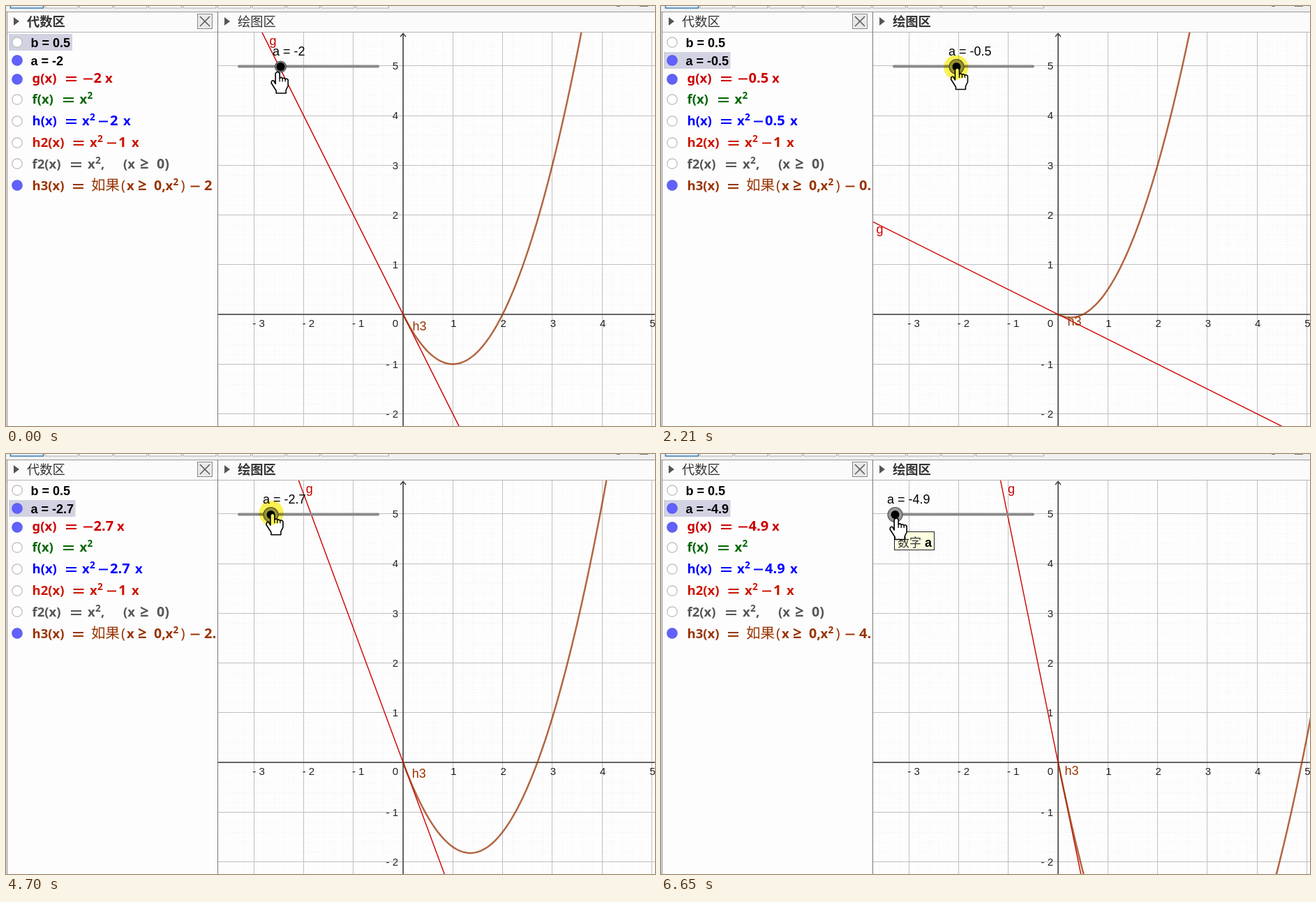
Animation of 930 by 602 pixels, one loop 7.08 s. Source, as an HTML page with a canvas:

```html
<!DOCTYPE html>
<html lang="zh">
<head>
<meta charset="utf-8">
<title>Slider and function graph</title>
<style>
html, body { margin: 0; width: 100%; height: 100%; overflow: hidden; background: #fff; }
canvas { display: block; }
</style>
</head>
<body>
<canvas id="stage" width="930" height="602"></canvas>
<script>
const ctx = document.getElementById('stage').getContext('2d');
const W = 930, H = 602, LOOP = 7080;
const OX = 569, OY = 442, UNIT = 71.3;
const LEFT = 304, TOP = 38;
const ARIAL = '"Liberation Sans", Arial, sans-serif';
const MATH = '"Noto Sans", "Open Sans", sans-serif';
const CJK = '"Noto Sans CJK SC", "Noto Sans CJK", sans-serif';

// [time, value] pairs
const SLIDE = [[730, -2], [1150, -1.68], [1460, -1.3], [1510, -1.22], [2210, -0.545], [2215, -0.5],
  [2740, -0.5], [3080, -1.16], [3210, -1.24], [3380, -1.6], [3480, -1.6], [3960, -2.06],
  [4070, -2.14], [4140, -2.2], [4230, -2.22], [4950, -2.9], [4980, -2.92], [5200, -3.17],
  [5250, -3.24], [5650, -4.3], [5700, -4.33], [6030, -4.87], [6040, -4.9]];
const HAND_Y = [[760, 89], [1140, 89.5], [2210, 89], [3080, 88], [3960, 85.5], [5200, 85],
  [6030, 89], [6170, 90]];

function track(keys, t) {
  if (t <= keys[0][0]) return keys[0][1];
  for (let i = 1; i < keys.length; i++) {
    const [t1, v1] = keys[i], [t0, v0] = keys[i - 1];
    if (t < t1) return v0 + (v1 - v0) * (t - t0) / (t1 - t0);
  }
  return keys[keys.length - 1][1];
}

const px = x => OX + x * UNIT;
const py = y => OY - y * UNIT;

function rect(x, y, w, h, color) {
  ctx.fillStyle = color;
  ctx.fillRect(x, y, w, h);
}

function disc(x, y, r, fill, stroke, width = 1) {
  ctx.beginPath();
  ctx.arc(x, y, r, 0, Math.PI * 2);
  if (fill) { ctx.fillStyle = fill; ctx.fill(); }
  if (stroke) { ctx.strokeStyle = stroke; ctx.lineWidth = width; ctx.stroke(); }
}

function line(points, color, width) {
  ctx.beginPath();
  points.forEach(([x, y]) => ctx.lineTo(x, y));
  ctx.strokeStyle = color;
  ctx.lineWidth = width;
  ctx.stroke();
}

function text(s, x, y, font, color, align = 'left') {
  ctx.font = font;
  ctx.fillStyle = color;
  ctx.textAlign = align;
  ctx.fillText(s, x, y);
  return ctx.measureText(s).width;
}

function triangle(x, y) {
  ctx.beginPath();
  ctx.moveTo(x, y - 6);
  ctx.lineTo(x + 8, y);
  ctx.lineTo(x, y + 6);
  ctx.fillStyle = '#555';
  ctx.fill();
}

function drawChrome(active) {
  rect(0, 0, W, 8, '#f0f0f0');
  for (let i = 0; i < 11; i++) {
    const x = 6.5 + i * 49.5;
    rect(x, 0, 47, 3, i ? '#fafafa' : '#e3eefa');
    line([[x, -1], [x, 3], [x + 47, 3], [x + 47, -1]], i ? '#aaa' : '#3c7fb1', i ? 1 : 1.6);
  }
  rect(875, 0, 5, 1, '#777');
  rect(908, 0, 12, 1, '#777');
  rect(0, 8, W, 1, '#999');
  rect(2, 9, W, 28, '#fbfbfb');
  rect(2, 37, W, 1, '#b4b4b4');
  rect(0, 9, 1, H, '#f0f0f0');
  rect(1, 9, 1, H, '#888');
  rect(303, 9, 1, H, '#777');
  triangle(11, 22);
  triangle(313, 22);
  const title = on => (on ? 'bold ' : '') + '18.3px ' + CJK;
  text('代数区', 30, 29, title(!active), '#333');
  text('绘图区', 332, 29, title(active), '#333');
  rect(274.5, 11.5, 21, 21, '#e9e9e9');
  ctx.strokeStyle = '#888';
  ctx.lineWidth = 1;
  ctx.strokeRect(274.5, 11.5, 21, 21);
  line([[278, 15], [292, 29]], '#555', 1.5);
  line([[292, 15], [278, 29]], '#555', 1.5);
}

// One algebra row: tools that share a baseline and colour
function row(y, color) {
  const put = (s, x, size = 18.5) => text(s, x, y, `bold ${size}px ${MATH}`, color);
  const bar = (x, w, dy) => rect(x, y - dy, w, 2, color);
  return {
    put,
    eq(x) { bar(x, 15, 9); bar(x, 15, 4); },
    minus(x) { bar(x, 13, 6.5); },
    square(x) {
      put('x', x);
      text('2', x + 11, y - 7, `bold 13.5px ${MATH}`, color);
    },
    term(n, x, gap) {
      const w = put(n, x, 20);
      put('x', x + w + gap);
    }
  };
}

function drawAlgebra(a, active) {
  const num = String(-a);
  const bold = 'bold 18px ' + ARIAL;
  const aText = 'a = ' + a;
  ctx.font = bold;
  if (active) rect(4, 66, ctx.measureText(aText).width + 34, 24, '#d2d2e2');
  else rect(4, 40, 91, 24, '#d2d2e2');

  [52, 78, 105, 134, 165, 196, 226, 257].forEach((y, i) => {
    const on = [1, 2, 7].includes(i);
    disc(16, y, 7.2, on ? '#6161ff' : '#fff', on ? '#5858e8' : '#b8b8b8', 1.2);
  });
  text('b = 0.5', 35.5, 58.5, bold, '#000');
  text(aText, 35.5, 84.5, bold, '#000');

  ctx.save();
  ctx.beginPath();
  ctx.rect(2, 38, 298, H);
  ctx.clip();

  let r = row(110, '#cc0000');
  r.put('g(x)', 37.5); r.eq(86); r.minus(111); r.term(num, 125.5, 5);

  r = row(140, '#006400');
  r.put('f(x)', 37.5); r.eq(82); r.square(105.5);

  r = row(171, '#0000ff');
  r.put('h(x)', 37.5); r.eq(86); r.square(109); r.minus(133); r.term(num, 149, 7.5);

  r = row(202, '#cc1400');
  r.put('h2(x)', 37.5); r.eq(96.5); r.square(120); r.minus(145); r.term('1', 161, 7.5);

  r = row(233, '#555');
  r.put('f2(x)', 37.5); r.eq(93); r.square(117); r.put(',', 136);
  r.put('(x', 168); r.put('≥', 192, 22); r.put('0)', 216, 19.5);

  r = row(264, '#993300');
  r.put('h3(x)', 37.5); r.eq(96);
  text('如果', 122, 264, '20.5px ' + CJK, '#993300');
  text('(', 165, 264, '20px ' + MATH, '#993300');
  r.put('x', 173); r.put('≥', 189, 22); r.put('0,', 212, 19.5);
  r.square(228.5);
  text(')', 250.5, 264, '20px ' + MATH, '#993300');
  r.minus(264.5); r.term(num, 284, 7.5);
  ctx.restore();
}

function drawGrid() {
  rect(LEFT, TOP, W, H, '#fdfdfd');
  ctx.setLineDash([1, 3]);
  for (let i = -18; i <= 27; i++) {
    if (i % 5) {
      const x = Math.round(px(i / 5)) + 0.5;
      line([[x, TOP], [x, H]], '#ededed', 1);
      const y = Math.round(py(i / 5)) + 0.5;
      if (y > TOP) line([[LEFT, y], [W, y]], '#ededed', 1);
    }
  }
  ctx.setLineDash([]);
  for (let i = -3; i <= 5; i++) {
    rect(Math.round(px(i) - 0.5), TOP, 1, H, '#c0c0c0');
    rect(LEFT, Math.round(py(i) - 0.3), W, 1, '#c0c0c0');
  }
  rect(LEFT, OY - 0.7, W, 1.4, '#333');
  rect(OX - 0.7, TOP + 1, 1.4, H, '#333');
  line([[OX - 4, 44], [OX, 39.5], [OX + 4, 44]], '#333', 1.3);

  const font = '15px ' + ARIAL;
  for (let i = -3; i <= 5; i++) {
    if (i === 0) continue;
    const s = i < 0 ? '- ' + -i : String(i);
    text(s, px(i) + (i < 0 ? 7 : 1), 459.5, font, '#222', 'center');
    if (i > -3) text(s, 562, py(i) + 5.5, font, '#222', 'right');
  }
  text('0', 562, 459.5, font, '#222', 'right');
}

function drawCurves(a) {
  const m = -a;
  line([[px(-6), py(6 * m)], [px(6), py(-6 * m)]], '#cc0000', 1.4);

  const points = [];
  for (let x = 0; x <= 5.6; x += 0.04) points.push([px(x), py(x * x + a * x)]);
  line(points, 'rgba(153,51,0,0.74)', 2.5);

  const font = '18px ' + ARIAL;
  const topX = OX - (OY - TOP) / m;
  if (topX > LEFT) text('g', topX + 10.5, 56, font, '#cc0000');
  else text('g', 308.5, OY - (OX - LEFT) * m + 14 + 5 * m, font, '#cc0000');

  const over = Math.max(0, m - 2.1);
  const y = 456 + 4.3 * Math.min(m, 2.1) - 1.8 * over;
  text('h3', 582.5 - 1.4 * over, y, font, '#993300');
}

function drawSlider(a, active) {
  const x = 433.5 + 20 * a;
  ctx.lineCap = 'round';
  line([[334, 86.5], [533, 86.5]], '#8a8a8a', 4);
  ctx.lineCap = 'butt';
  disc(x, 87, active ? 10.5 : 8, active ? '#999' : '#777', '#555', 1.2);
  disc(x, 87, 6, '#000');
  text('a = ' + a, x - 11.5, 71, '18px ' + ARIAL, '#000');
}

function drawTip(x, y) {
  rect(x, y, 58, 27, '#ffffe1');
  ctx.strokeStyle = '#222';
  ctx.lineWidth = 1;
  ctx.strokeRect(x + 0.5, y + 0.5, 57, 26);
  text('数字', x + 5, y + 22, '17px ' + CJK, '#333');
  text('a', x + 44, y + 22, 'bold 18px ' + ARIAL, '#000');
}

function drawHand(x, y) {
  ctx.save();
  ctx.translate(x, y);
  ctx.beginPath();
  ctx.moveTo(-3, 17);
  ctx.lineTo(-3, 2);
  ctx.quadraticCurveTo(0, -2, 3, 2);
  ctx.lineTo(3, 9);
  for (let i = 0; i < 3; i++) {
    const k = 3 + i * 4;
    ctx.quadraticCurveTo(k + 2, 6.5 + i, k + 4, 9.5 + i);
  }
  ctx.lineTo(15, 20);
  ctx.lineTo(12, 26);
  ctx.lineTo(12, 30.5);
  ctx.lineTo(-2, 30.5);
  ctx.lineTo(-2, 27);
  ctx.lineTo(-9, 16);
  ctx.quadraticCurveTo(-9, 11.5, -5.5, 12.5);
  ctx.closePath();
  ctx.fillStyle = '#fff';
  ctx.fill();
  ctx.strokeStyle = '#000';
  ctx.lineWidth = 1.6;
  ctx.lineJoin = 'round';
  ctx.stroke();
  for (let i = 0; i < 3; i++) {
    const k = 3 + i * 4;
    line([[k, 8.5 + i], [k, 14]], '#000', 1.3);
  }
  ctx.restore();
}

function draw(t) {
  const pos = track(SLIDE, t);
  const a = Math.round(pos * 10) / 10;
  const active = t >= 510;

  // the pointer reaches the knob in three hops
  const hops = t < 60 ? 0 : Math.min(3, Math.floor((t - 60) / 75) + 1);
  const far = 1 - hops / 3;
  const hx = 433.5 + 20 * pos + 1.7 - 6 * far;
  const hy = t < 760 ? 89 + 5.5 * far : t >= 6470 ? 92 : track(HAND_Y, t);

  ctx.clearRect(0, 0, W, H);
  rect(0, 0, W, H, '#fdfdfd');
  drawChrome(active);
  drawAlgebra(a, active);

  ctx.save();
  ctx.beginPath();
  ctx.rect(LEFT, TOP, W - LEFT, H - TOP);
  ctx.clip();
  drawGrid();
  drawCurves(a);
  drawSlider(a, active);
  ctx.restore();

  if (t >= 400 && t < 510) drawTip(393, 109);
  if (t >= 6650) drawTip(334, 111);
  drawHand(hx, hy);
  if (active && t < 6340) {
    ctx.globalCompositeOperation = 'multiply';
    disc(hx - 1.7, hy - 1, 17.5, '#fbf353');
    ctx.globalCompositeOperation = 'source-over';
  }
}

const start = performance.now();
function tick() {
  draw((performance.now() - start) % LOOP);
  requestAnimationFrame(tick);
}
tick();
</script>
</body>
</html>
```
